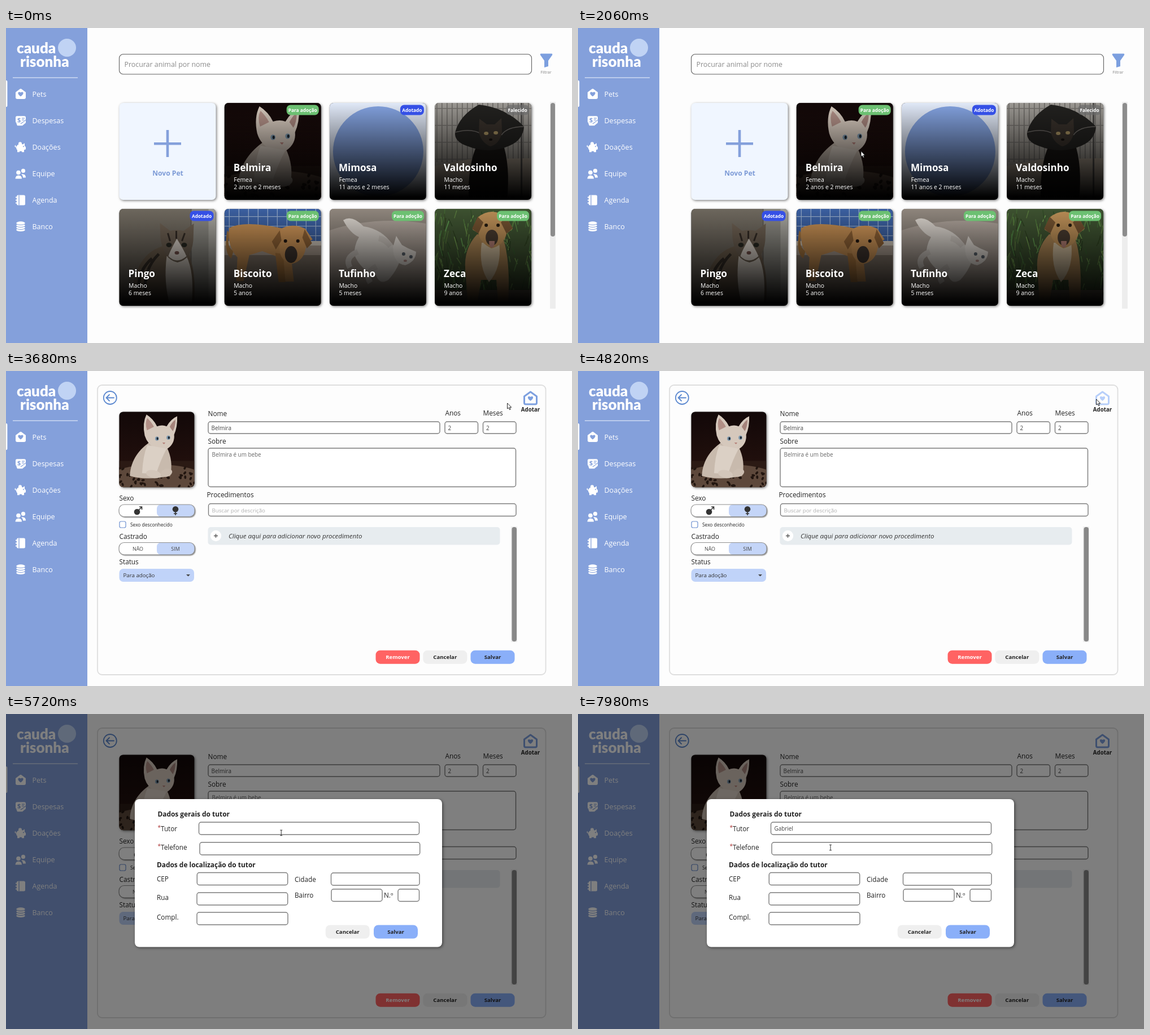
Recreate the animation shown at these times as an HTML page with a canvas. Size 1002 px wide and 559 px high, loop 8 s.

```html
<!DOCTYPE html>
<html lang="pt">
<head>
<meta charset="utf-8">
<style>
html, body { margin: 0; width: 100%; height: 100%; overflow: hidden; background: #fdfdfd; }
canvas { display: block; width: 1002px; height: 559px; }
</style>
</head>
<body>
<canvas id="stage"></canvas>
<script>
const W = 1002, H = 559, LOOP = 8000;
const SANS = '"Open Sans", "Noto Sans", sans-serif';
const BLUE = '#84a0db', INK = '#222';
const cv = document.getElementById('stage');
const c = cv.getContext('2d');
const dpr = window.devicePixelRatio || 1;
cv.width = W * dpr;
cv.height = H * dpr;

// ---------- helpers ----------
function text(s, x, y, size, color = INK, style = '', align = 'left') {
  c.font = `${style} ${size}px ${SANS}`;
  c.textAlign = align;
  c.fillStyle = color;
  c.fillText(s, x, y);
}
function box(x0, y0, x1, y1, r, fill, stroke, lw = 1.4) {
  c.beginPath();
  c.roundRect(x0, y0, x1 - x0, y1 - y0, r);
  if (fill) { c.fillStyle = fill; c.fill(); }
  if (stroke) { c.strokeStyle = stroke; c.lineWidth = lw; c.stroke(); }
}
function shape(d, fill, stroke, lw = 1) {
  const p = new Path2D(d);
  if (fill) { c.fillStyle = fill; c.fill(p); }
  if (stroke) { c.strokeStyle = stroke; c.lineWidth = lw; c.stroke(p); }
}
function oval(x, y, rx, ry, fill, rot = 0) {
  c.beginPath();
  c.ellipse(x, y, rx, ry, rot, 0, 7);
  c.fillStyle = fill;
  c.fill();
}
function rect(x, y, w, h, fill) { c.fillStyle = fill; c.fillRect(x, y, w, h); }
function at(x, y, draw, k = 1) {
  c.save();
  c.translate(x, y);
  c.scale(k, k);
  draw();
  c.restore();
}
function shadow(on, blur = 4) {
  c.shadowColor = on ? 'rgba(0,0,0,.5)' : 'transparent';
  c.shadowBlur = blur * dpr;
  c.shadowOffsetX = c.shadowOffsetY = 1.5 * dpr;
}
function fade(y0, y1, a, b) {
  const g = c.createLinearGradient(0, y0, 0, y1);
  g.addColorStop(0, a);
  g.addColorStop(1, b);
  return g;
}
function rng(seed) {
  return () => (seed = (seed * 16807) % 2147483647) / 2147483647;
}

// ---------- pet pictures, on a 171 x 172 field ----------
function kitten() {
  rect(0, 0, 171, 172, fade(0, 172, '#120808', '#28130f'));
  rect(0, 112, 171, 60, '#2b1a14');
  oval(85, 152, 110, 32, '#5d483b');
  const r = rng(11);
  for (let i = 0; i < 50; i++) oval(r() * 171, 128 + r() * 44, 4, 2.5, '#21150f', r() * 3);
  shape('M68 70 C48 84 26 108 24 146 Q62 158 116 146 Q124 112 108 80Z', '#c8baad');
  shape('M58 54 Q52 26 62 6 Q78 16 86 33 Q98 29 108 33 Q118 16 132 10 Q133 34 125 52 Q127 72 110 84 Q98 91 82 82 Q64 74 58 54Z', '#d5c8bc');
  shape('M63 42 Q58 24 64 14 Q74 24 79 34Z', '#b18f86');
  shape('M115 34 Q121 22 128 18 Q128 34 122 44Z', '#a5837b');
  shape('M64 76 Q54 100 52 140 L84 142 Q94 110 108 84Z', '#dbd0c5');
  oval(86, 61, 4.3, 4.8, '#7e98ad');
  oval(112, 59, 4.3, 4.8, '#7e98ad');
  oval(87, 61, 2, 3, '#18212b');
  oval(113, 59, 2, 3, '#18212b');
  shape('M98 70 h7 l-3 4Z', '#b47f77');
  oval(78, 142, 17, 9, '#d3c6ba', .2);
  oval(108, 139, 13, 9, '#cbbdb0', -.3);
}
function plainDisc() {
  rect(0, 0, 171, 172, '#e0e8f7');
  oval(86, 86, 80, 80, '#82a1de');
}
function coneCat() {
  rect(0, 0, 171, 172, fade(0, 172, '#9a9792', '#8b857c'));
  for (let x = 3; x < 171; x += 9) rect(x, 0, 1.4, 105, '#65625f');
  for (let y = 9; y < 100; y += 30) rect(0, y, 171, 1.5, '#716e6a');
  shape('M0 112 L60 100 L171 98 V172 H0Z', '#a19586');
  rect(152, 0, 3, 172, '#4d4b49');
  shape('M76 72 Q58 108 60 172 H128 Q134 110 120 70Z', '#171412');
  shape('M36 52 Q44 22 78 3 Q126 8 158 42 Q156 66 132 76 Q96 92 56 76 Q34 68 36 52Z', '#22211f');
  shape('M36 52 Q66 44 82 55 M158 42 Q128 42 118 57', null, '#66625e', 1.5);
  shape('M78 52 L79 28 L92 38 H106 L118 27 L119 52 Q114 74 98 77 Q82 70 78 52Z', '#37302a');
  oval(91, 54, 4, 3, '#a18c5d');
  oval(108, 53, 4, 3, '#a18c5d');
  oval(99, 65, 3, 2, '#14100e');
}
function tabby() {
  rect(0, 0, 171, 172, fade(0, 172, '#6d675d', '#736b61'));
  rect(126, 0, 45, 172, '#88867f');
  rect(126, 0, 2, 172, '#5a554e');
  rect(158, 0, 13, 172, '#a2a099');
  shape('M78 66 C48 74 22 102 20 172 H132 Q138 112 120 72Z', '#6d5e4d');
  shape('M70 80 Q42 108 46 150 M58 88 Q34 108 34 142', null, '#352e27', 5);
  shape('M84 84 Q78 130 90 172 H128 Q134 112 118 82Z', '#d3cbc1');
  shape('M73 52 L72 25 L90 39 Q101 36 114 39 L132 26 L131 56 Q128 90 103 95 Q78 90 73 52Z', '#6c5f51');
  shape('M102 53 Q89 76 87 84 Q102 99 119 84 Q114 72 102 53Z', '#d9d1c8');
  shape('M86 43 L90 57 M101 39 V53 M116 43 L111 57', null, '#332b25', 3);
  oval(88, 64, 5, 4, '#272821');
  oval(115, 64, 5, 4, '#272821');
  oval(102, 78, 4, 3, '#704f49');
}
function tanDog() {
  rect(0, 0, 171, 172, '#a3968a');
  rect(0, 0, 171, 60, '#3b5f9f');
  for (let x = 8; x < 171; x += 17) rect(x, 0, 1.2, 60, '#96aac6');
  for (let y = 13; y < 60; y += 17) rect(0, y, 171, 1.2, '#96aac6');
  rect(0, 57, 171, 8, '#cbc2b5');
  rect(0, 82, 171, 90, '#7c7064');
  shape('M5 38 Q-2 78 12 88 L16 75 Q2 66 10 45Z', '#a0723d');
  shape('M8 34 Q34 20 100 34 Q128 40 125 73 L118 85 L123 129 H108 L102 88 L67 75 L44 82 L34 128 H21 L23 86 Q5 68 8 34Z', '#bf8a50');
  shape('M90 78 L96 130 H108 L104 80Z', '#aa763e');
  shape('M99 36 Q119 24 143 35 L156 54 L145 62 Q143 93 118 98 Q94 90 98 62 L89 64Z', '#c99155');
  shape('M98 38 L84 58 L91 72 L101 56Z M142 36 L155 61 L146 70 L138 51Z', '#8c6034');
  oval(118, 81, 11, 15, '#3e342e');
  oval(108, 57, 3, 3, '#211711');
  oval(130, 57, 3, 3, '#211711');
}
function lyingKitten() {
  rect(0, 0, 171, 172, fade(0, 172, '#aaa098', '#9b8f84'));
  shape('M0 0 H171 V26 Q80 12 0 38Z', '#8e857c');
  shape('M24 20 Q40 10 60 31 Q93 36 111 63 L128 77 Q124 104 104 126 Q88 136 82 117 Q56 110 44 82 Q43 65 52 50 Q36 43 24 20Z', '#d6d0c9');
  shape('M50 76 Q26 86 36 104 M83 102 Q61 114 72 131 M108 66 Q98 54 87 52', null, '#cac3bc', 10);
  shape('M112 68 L118 48 L128 64 L139 70 L153 76 Q153 93 134 100 Q113 98 112 68Z', '#e0dad3');
  oval(131, 80, 3, 3, '#58616a');
  oval(144, 85, 3, 3, '#58616a');
  oval(134, 92, 3, 2, '#b28c85');
}
function grassDog() {
  rect(0, 0, 171, 172, '#3d5130');
  const r = rng(29);
  for (let i = 0; i < 240; i++) {
    const x = r() * 180, y = r() * 150;
    c.strokeStyle = `hsl(${88 + r() * 22} 33% ${18 + r() * 32}%)`;
    c.lineWidth = 1.5;
    c.beginPath();
    c.moveTo(x, y);
    c.lineTo(x + r() * 16 - 8, y + 10 + r() * 14);
    c.stroke();
  }
  rect(0, 144, 171, 28, '#776c5b');
  shape('M75 45 Q51 70 54 108 L58 162 H76 L82 126 L109 126 L112 164 H130 Q134 92 121 52Z', '#a98353');
  shape('M83 60 Q77 103 96 130 Q119 104 114 60Z', '#ccb99a');
  shape('M76 15 Q101 -5 127 15 L138 35 L127 44 Q122 65 100 70 Q80 60 77 43 L67 37Z', '#b88c55');
  shape('M76 14 L66 35 L77 44 L86 24Z M126 14 L138 34 L127 44 L117 24Z', '#70502f');
  oval(101, 51, 11, 14, '#46392e');
  oval(91, 29, 3, 3, '#22190f');
  oval(112, 29, 3, 3, '#22190f');
  shape('M96 57 h10 q0 12 -5 12 q-5 0 -5 -12', '#ae7a70');
}

const TAGS = {
  'Para adoção': ['#6cc072', 57],
  'Adotado': ['#3550e6', 42],
  'Falecido': ['rgba(105,105,105,.65)', 41]
};
const PETS = [
  ['Belmira', 'Femea', '2 anos e 2 meses', 'Para adoção', kitten],
  ['Mimosa', 'Femea', '11 anos e 2 meses', 'Adotado', plainDisc],
  ['Valdosinho', 'Macho', '11 meses', 'Falecido', coneCat],
  ['Pingo', 'Macho', '6 meses', 'Adotado', tabby],
  ['Biscoito', 'Macho', '5 anos', 'Para adoção', tanDog],
  ['Tufinho', 'Macho', '5 meses', 'Para adoção', lyingKitten],
  ['Zeca', 'Macho', '9 anos', 'Para adoção', grassDog]
];

function picture(x, y, k, draw, extra) {
  shadow(true);
  box(x, y, x + 171 * k, y + 172 * k, 7, '#222');
  shadow(false);
  c.save();
  c.beginPath();
  c.roundRect(x, y, 171 * k, 172 * k, 7);
  c.clip();
  at(x, y, () => { draw(); if (extra) extra(); }, k);
  c.restore();
}

function petCard(x, y, [name, sex, age, tag, draw]) {
  picture(x, y, 1, draw, () => rect(0, 0, 171, 172, fade(0, 168, 'rgba(0,0,0,0)', '#000')));
  const [color, w] = TAGS[tag];
  box(x + 167 - w, y + 3.5, x + 167, y + 21.5, 7, color);
  text(tag, x + 167 - w / 2, y + 15.5, 8.3, '#fff', 'bold', 'center');
  text(name, x + 16, y + 121, 17.1, '#fff', 'bold');
  text(sex, x + 16.5, y + 140, 10.4, '#fff');
  text(age, x + 16.5, y + 153, 10.4, '#fff');
}

// ---------- sidebar ----------
const HEART = 'M0 4.5 C-8 -1 -4 -6 0 -2.4 C4 -6 8 -1 0 4.5Z';
const ICONS = [
  () => {
    shape('M-9 -3 L-1 -9 Q0 -9.6 1 -9 L9 -3 V6 Q9 9 6 9 H-6 Q-9 9 -9 6Z', '#fff');
    shape(HEART, BLUE);
  },
  () => {
    box(-9, -8, 9, 4, 2.5, '#fff');
    shape('M-8 4 H5 L9 0 V4 L3 9 H-6Z', '#fff');
    text('$', -6, 3, 11, BLUE, 'bold');
    shape('M2 -4 H7 M2 -1 H6 M0 6 L9 -1', null, BLUE, 1.2);
  },
  () => {
    oval(0, 1, 8, 6.5, '#fff');
    oval(-1, -6, 3, 3, '#fff');
    shape('M3 -4 L7 -7 V-2 L9 0 V4 L6 5 V9 H2 V6 H-2 V9 H-6 V4Z', '#fff');
    oval(5, -1, 1, 1, BLUE);
    shape('M-8 0 Q-11 -1 -9 -3', null, '#fff', 1.5);
  },
  () => {
    oval(4.5, -5, 3.6, 3.6, '#fff');
    oval(-4, -2, 3.8, 3.8, '#fff');
    shape('M-9.5 9 Q-9 3 -4 3 Q2 3 2 9Z M1 1 Q9 0 9 7 H4 Q4 3 1 1Z', '#fff');
  },
  () => {
    box(-7, -9, 8, 9, 2.5, '#fff');
    shape('M-3 -9 V9', null, BLUE, 1.3);
    shape('M-9 -5 H-5 M-9 0 H-5 M-9 5 H-5', null, '#fff', 2);
  },
  () => {
    for (let y = 6; y >= -6; y -= 4) {
      oval(0, y, 8.4, 3.2, BLUE);
      oval(0, y - .6, 7.8, 2.8, '#fff');
    }
  }
];
const MENU = ['Pets', 'Despesas', 'Doações', 'Equipe', 'Agenda', 'Banco'];

function sidebar() {
  rect(0, 0, 144, H, BLUE);
  oval(108, 35, 16, 16, '#c0d3f4');
  c.font = '900 26px Lato, sans-serif';
  c.textAlign = 'left';
  c.fillStyle = '#fff';
  c.fillText('cauda', 19, 45);
  c.fillText('risonha', 25, 69);
  rect(12, 87.6, 115, 1.2, '#dfe8f8');
  box(-3, 93, 2.4, 140, 2, '#fff');
  MENU.forEach((label, i) => {
    const y = 117 + i * 47.15;
    at(26, y, ICONS[i]);
    text(label, 46.5, y + 4.6, 12.5, '#fff');
  });
}

// ---------- screens ----------
function listScreen() {
  box(200.5, 46.5, 930.5, 82, 7, '#fff', '#606060', 1.1);
  text('Procurar animal por nome', 209.5, 69, 12.4, '#8b8b8b');
  shape('M947 45.5 H966 Q968 46 967 48 L960 58 V68 L953 70 V58 L946 48 Q945 46 947 45.5Z', '#7c9fdf');
  text('Filtrar', 956, 80.5, 7.2, '#888', '', 'center');

  shadow(true);
  box(200.5, 133, 371.5, 305, 7, '#f0f6ff');
  shadow(false);
  shape('M286 181 V229 M262 205.3 H310', null, BLUE, 4.6);
  text('Novo Pet', 286.5, 262, 12.1, '#7c9ad6', 'bold', 'center');
  PETS.forEach((pet, i) => {
    const n = i + 1;
    petCard(200.5 + n % 4 * 186.2, n < 4 ? 133 : 321, pet);
  });
  rect(963, 131, 10, 367, '#ededed');
  box(964, 133, 972, 370, 4, '#8c8c8c');
}

const field = (x0, y0, x1, y1) => box(x0, y0, x1, y1, 4, '#fff', '#7b7b7b');

function button(x, y, label, fill, color = INK) {
  box(x, y, x + 78, y + 24, 8, fill);
  text(label, x + 39, y + 15, 9.6, color, 'bold', 'center');
}

function toggle(y) {
  shadow(true, 2);
  box(200, y, 334, y + 21.5, 9, '#fff');
  shadow(false);
  box(267, y, 334, y + 21.5, [7, 9, 9, 7], '#c4d5f8');
  box(200, y, 334, y + 21.5, 9, null, '#909090', 1.2);
}

function detailScreen(hover) {
  box(162, 25, 955.5, 539, 8, '#fdfdfd', '#dedede', 1.8);
  c.lineCap = 'round';
  box(172.8, 36, 195.8, 59, 12, null, '#5b88cf', 1.8);
  shape('M191 47.5 H178 M183 42 L177.5 47.5 L183 53', null, '#5b88cf', 1.8);
  c.lineCap = 'butt';
  picture(200.5, 72.5, .777, kitten);

  const tint = hover ? '#b7cffa' : '#7c9fdf';
  at(928.5, 48.5, () => {
    c.lineJoin = 'round';
    shape('M-11 -3.5 L0 -11.5 L11 -3.5 V8 Q11 10.5 8.5 10.5 H-8.5 Q-11 10.5 -11 8Z', null, tint, 3);
    shape(HEART, tint);
    c.lineJoin = 'miter';
  });
  text('Adotar', 928.5, 72, 9.7, INK, 'bold', 'center');

  [['Nome', 357.5, 80], ['Anos', 777.5, 79], ['Meses', 844.5, 79], ['Sobre', 357.5, 129],
   ['Procedimentos', 355.5, 224], ['Sexo', 200.5, 230], ['Castrado', 200.5, 298], ['Status', 200.5, 343]]
    .forEach(([s, x, y]) => text(s, x, y, 11.8));
  field(358, 90, 768, 111);
  field(777, 90, 835.5, 111);
  field(844.5, 90, 903, 111);
  field(358, 137, 902.5, 205.5);
  field(358.5, 235.5, 903, 257.5);
  text('Belmira', 363.5, 104.5, 9.9, '#444');
  text('2', 782.5, 104.5, 9.9, '#444');
  text('2', 850, 104.5, 9.9, '#444');
  text('Belmira é um bebe', 364.5, 151.5, 9.9, '#666');
  text('Buscar por descrição', 364.5, 250.5, 9.7, '#b0b0b0');

  toggle(237);
  oval(232, 250, 5.3, 5.3, '#333');
  shape('M234 248 L240 241.5 M236 241 H240.5 V246', null, '#333', 1.6);
  oval(300, 245.3, 5.3, 5.3, '#333');
  shape('M300 249 V256 M297 253 H303', null, '#333', 1.6);
  box(201, 267, 212, 278, 2.5, '#fff', '#6d90d0', 1.2);
  text('Sexo desconhecido', 220, 276, 8.4);
  toggle(304.5);
  text('NÃO', 233.5, 318.5, 8.9, '#444', '', 'center');
  text('SIM', 300, 318.5, 8.9, '#444', '', 'center');
  box(200.5, 351, 333, 374, 7, '#c0d3f9');
  text('Para adoção', 207.5, 366, 9.7, '#333');
  shape('M319 361 h7 l-3.5 3.6Z', '#444');

  box(357.5, 277, 874.5, 308.5, 5, '#e7ecef');
  oval(371.5, 292.5, 9.7, 9.7, '#fff');
  shape('M371.5 289 V296 M368 292.5 H375', null, '#555', 1.3);
  text('Clique aqui para adicionar novo procedimento', 394, 297, 11.5, '#333', 'italic');
  rect(894, 276, 11, 205, '#eee');
  box(895.5, 277, 904, 480, 4, '#888');

  button(654.5, 495.7, 'Remover', '#ff6363', '#fff');
  button(738.3, 495.7, 'Cancelar', '#efefef');
  button(822.5, 495.7, 'Salvar', '#8aaff9');
}

const DIALOG_FIELDS = [
  [341.5, 192, 731.5, 214], [343, 227.8, 732.7, 250],
  [338.3, 281.5, 498.7, 303.5], [575.5, 282, 732, 304], [338, 317, 498.7, 339],
  [576, 310.7, 666, 332.5], [694, 310.7, 731.5, 332.5], [338, 352, 499, 374]
];

function dialog(name, caret) {
  rect(0, 0, W, H, 'rgba(0,0,0,.5)');
  shadow(true, 5);
  box(228, 151, 772, 413.5, 8, '#fff');
  shadow(false);
  text('Dados gerais do tutor', 268.5, 182, 11.9, INK, 'bold');
  text('Dados de localização do tutor', 267, 272, 11.9, INK, 'bold');
  [['Tutor', 274, 207.5], ['Telefone', 274, 241], ['CEP', 267, 297], ['Cidade', 511, 298],
   ['Rua', 267, 330], ['Bairro', 511, 326], ['N.º', 669, 326], ['Compl.', 267, 365]]
    .forEach(([s, x, y]) => text(s, x, y, 11.7));
  text('*', 268.5, 204.5, 10, '#a33');
  text('*', 268.5, 238, 10, '#a33');
  DIALOG_FIELDS.forEach(f => field(...f));
  button(565.7, 374.5, 'Cancelar', '#efefef');
  button(651, 374.5, 'Salvar', '#8aaff9');
  text(name, 347.5, 206.5, 9.9, '#444');
  if (caret) rect(347.5 + c.measureText(name).width, 197, 1, 11.5, '#222');
}

// ---------- pointer ----------
// start, end, number of steps, then the points passed
const MOVES = [
  [910, 1030, 3, [715, 496], [520, 342]],
  [1290, 1740, 8, [520, 342], [508, 270], [491, 211], [501, 218.5]],
  [3040, 3430, 6, [501, 218.5], [494, 227], [660, 180], [866, 62.5]],
  [3680, 3750, 2, [866, 62.5], [909, 51.5]],
  [4180, 4320, 3, [909, 51.5], [917.5, 50]],
  [5200, 5725, 9, [917.5, 50], [800, 140], [620, 215], [500, 217], [477, 206]],
  [7600, 7980, 6, [477, 206], [447, 237]]
];

function pointerAt(t) {
  const move = MOVES.filter(m => t >= m[0]).pop();
  if (!move) return null;
  const [t0, t1, n, ...pts] = move;
  const step = Math.min(n, 1 + Math.floor((t - t0) / (t1 - t0) * (n - 1) + 1e-6));
  const u = step / n * (pts.length - 1);
  const i = Math.min(Math.floor(u), pts.length - 2);
  const k = u - i;
  return [0, 1].map(a => pts[i][a] + (pts[i + 1][a] - pts[i][a]) * k);
}

function pointer(t) {
  const p = pointerAt(t);
  if (!p) return;
  const [x, y] = p;
  const inField = t >= 4900 &&
    DIALOG_FIELDS.some(f => x > f[0] && x < f[2] && y > f[1] && y < f[3]);
  at(x, y, () => {
    if (inField) shape('M-2 -4.8 H2 M-2 4.8 H2 M0 -4.8 V4.8', null, '#333', 1);
    else shape('M0 0 V10 L2.3 8 L4 11.7 L5.7 11 L4.1 7.4 H7.2Z', '#fff', '#111', .9);
  });
}

// ---------- timeline ----------
const NAME = 'Gabriel';
const KEYS = [6350, 6530, 6580, 6720, 6780, 7020, 7090];

function render(t) {
  c.setTransform(dpr, 0, 0, dpr, 0, 0);
  rect(0, 0, W, H, '#fdfdfd');
  sidebar();
  if (t < 2140) listScreen();
  else detailScreen(t >= 4250 && t < 4900);
  if (t >= 4900) {
    const typed = KEYS.filter(k => t >= k).length;
    dialog(NAME.slice(0, typed), t >= 5790 && t < 7600);
  }
  pointer(t);
}

const begin = performance.now();
function tick() {
  render((performance.now() - begin) % LOOP);
  requestAnimationFrame(tick);
}
tick();
</script>
</body>
</html>
```
